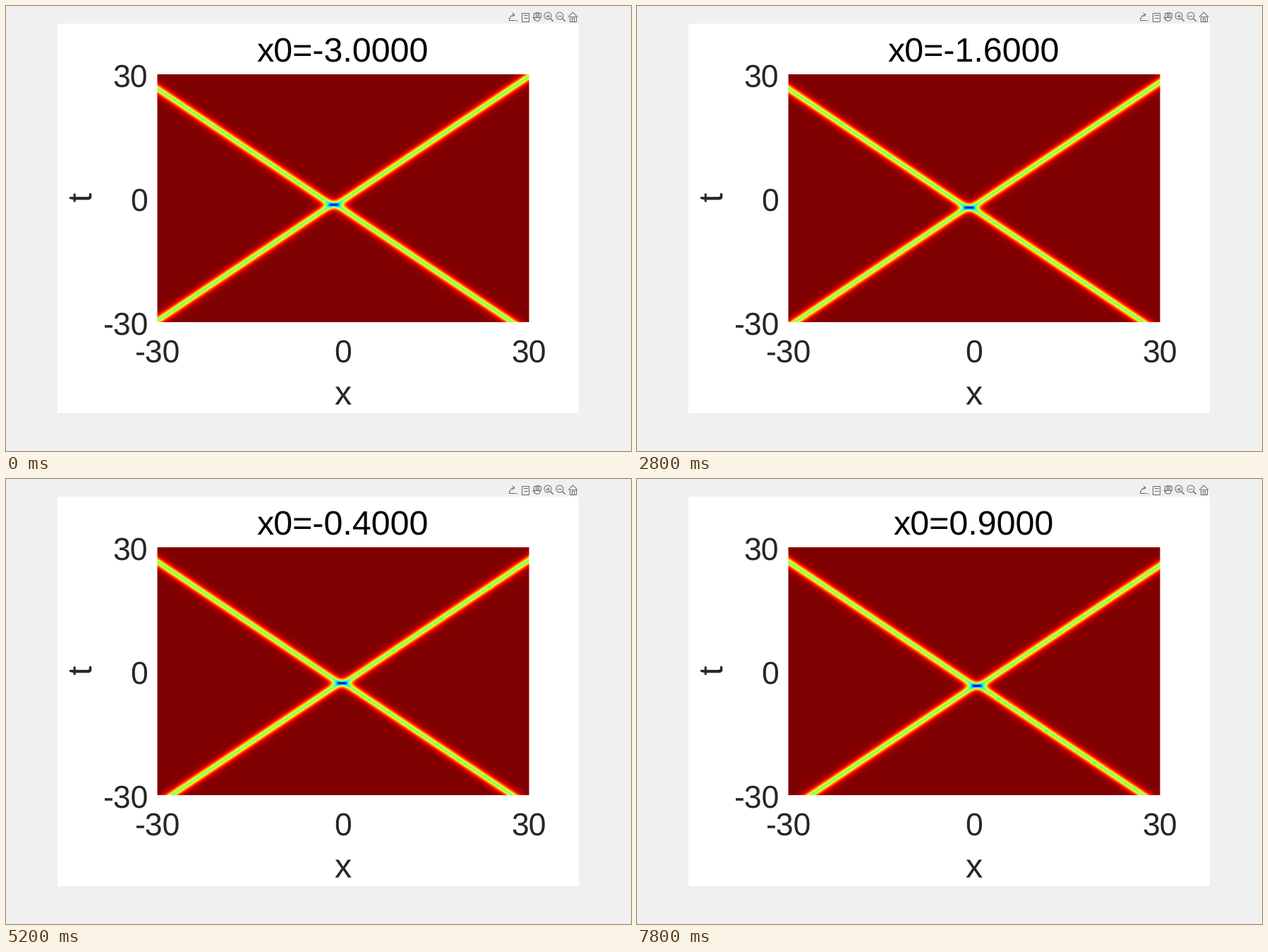
Write a matplotlib script that moves like this. It is 886 by 632 pixels and loops after 8000 ms.

```python
import numpy as np
import matplotlib.pyplot as plt
from matplotlib.animation import FuncAnimation
from matplotlib.patches import Arc, Circle, Rectangle

W, H, DPI = 886, 632, 64
FRAMES, INTERVAL = 40, 200
SPAN = 30                          # both axes run from -SPAN to SPAN
CX, CY = 478, 273.5                # plot centre in pixels
HALF_W, HALF_H = 263.5, 176
TICK, LABEL = 44.5, 48.4
DARK, ICON = "#262626", "#6a6a6a"
ICON_Y = 15

plt.rcParams["font.family"] = "Liberation Sans"
plt.rcParams["text.hinting"] = "none"
plt.rcParams["toolbar"] = "None"

fig = plt.figure(figsize=(W / DPI, H / DPI), dpi=DPI, facecolor="#f0f0f0")
ax = fig.add_axes([0, 0, 1, 1])
ax.axis("off")


def pt(px):
    return px * 72 / DPI


def write(x, y, text, size, color=DARK, ha="center", **kw):
    return ax.text(x, y, text, fontsize=pt(size), color=color,
                   ha=ha, va="baseline", **kw)


def stroke(xs, ys, width=1.0):
    ax.plot(xs, ys, color=ICON, lw=pt(width), solid_capstyle="round")


def outline(shape, *args, **kw):
    ax.add_patch(shape(*args, fill=False, ec=ICON, lw=pt(1), **kw))


def export_icon(x):
    stroke([x - 5, x - 5, x + 4], [ICON_Y + 2, ICON_Y + 5, ICON_Y + 5])
    outline(Arc, (x + 3, ICON_Y + 3), 13, 11, theta1=180, theta2=270)
    stroke([x, x + 3, x], [ICON_Y - 5, ICON_Y - 2.5, ICON_Y])
    ax.plot(x + 6.5, ICON_Y + 5.5, "v", color=ICON, ms=2, mew=0)


def datatip_icon(x):
    outline(Rectangle, (x - 4.5, ICON_Y - 5.5), 10, 12)
    for dy in (-2, 2):
        stroke([x - 2, x + 3], [ICON_Y + dy] * 2)


def hand_icon(x):
    outline(Arc, (x, ICON_Y + 1), 9, 11, theta1=0, theta2=180)
    for i in range(4):
        tip = ICON_Y - 6 + (i - 1.5) ** 2 / 2
        outline(Rectangle, (x - 4.5 + 2.3 * i, tip), 2.2, ICON_Y + 1 - tip)
    stroke([x - 6, x - 3], [ICON_Y + 1, ICON_Y + 5])


def zoom_icon(x, plus):
    outline(Circle, (x, ICON_Y - 1), 5)
    stroke([x + 4, x + 7.5], [ICON_Y + 3, ICON_Y + 6.5], 1.4)
    stroke([x - 2.5, x + 2.5], [ICON_Y - 1] * 2)
    if plus:
        stroke([x, x], [ICON_Y - 3.5, ICON_Y + 1.5])


def home_icon(x):
    stroke([x - 6.5, x, x + 6.5], [ICON_Y + 0.5, ICON_Y - 6, ICON_Y + 0.5])
    for half, top in ((4.7, -0.5), (1.5, 2)):
        outline(Rectangle, (x - half, ICON_Y + top), 2 * half, 6.5 - top)


# pixel centres mapped to plot coordinates
cols = np.arange(214, 742)
rows = np.arange(97, 449)
xg = (SPAN * (cols + 0.5 - CX) / HALF_W)[None, :]
tg = (SPAN * (CY - rows - 0.5) / HALF_H)[:, None]

# the plot's left and right edges fall inside a pixel
cover = np.clip(HALF_W + 0.5 - np.abs(cols + 0.5 - CX), 0, 1)[None, :, None]


def amplitude(x0):
    """Modulus of two colliding dark solitons with speeds +1 and -1."""
    k = np.sqrt(3)
    cs = np.cosh(k * (xg - x0 / 2))
    cd = np.cosh(k * (tg + 3 + x0 / 2))
    density = 1 - 3 * (1 + 2 * cs * cd) / (cs + 2 * cd) ** 2
    return np.sqrt(np.clip(density, 0, 1))


def picture(x0):
    v = amplitude(x0)[..., None]
    jet = np.clip(1.5 - np.abs(4 * v - np.arange(3, 0, -1)), 0, 1)
    return jet * cover + 1 - cover


ax.add_patch(Rectangle((73, 25), 739, 553, fc="white", lw=0))
image = ax.imshow(picture(-3), extent=(214, 742, 449, 97),
                  interpolation="nearest", aspect="auto", zorder=2)

export_icon(718)
datatip_icon(736)
hand_icon(753)
zoom_icon(768, plus=True)
zoom_icon(785, plus=False)
home_icon(803.5)

for side in (-1, 0, 1):
    write(CX + HALF_W * side, 506, str(SPAN * side), TICK)
    write(201, 290.6 - HALF_H * side, str(SPAN * side), TICK, ha="right")
write(CX, 566, "x", LABEL)
write(121, 271.6, "t", LABEL, rotation=90, rotation_mode="anchor")
title = write(477.5, 79, "", LABEL, color="black")

ax.set_xlim(0, W)
ax.set_ylim(H, 0)


def update(i):
    x0 = (i - 30) / 10
    image.set_data(picture(x0))
    title.set_text(f"x0={x0:.4f}")
    return image, title


anim = FuncAnimation(fig, update, frames=FRAMES, interval=INTERVAL,
                     repeat=True, repeat_delay=0, blit=False)
plt.show()
```
